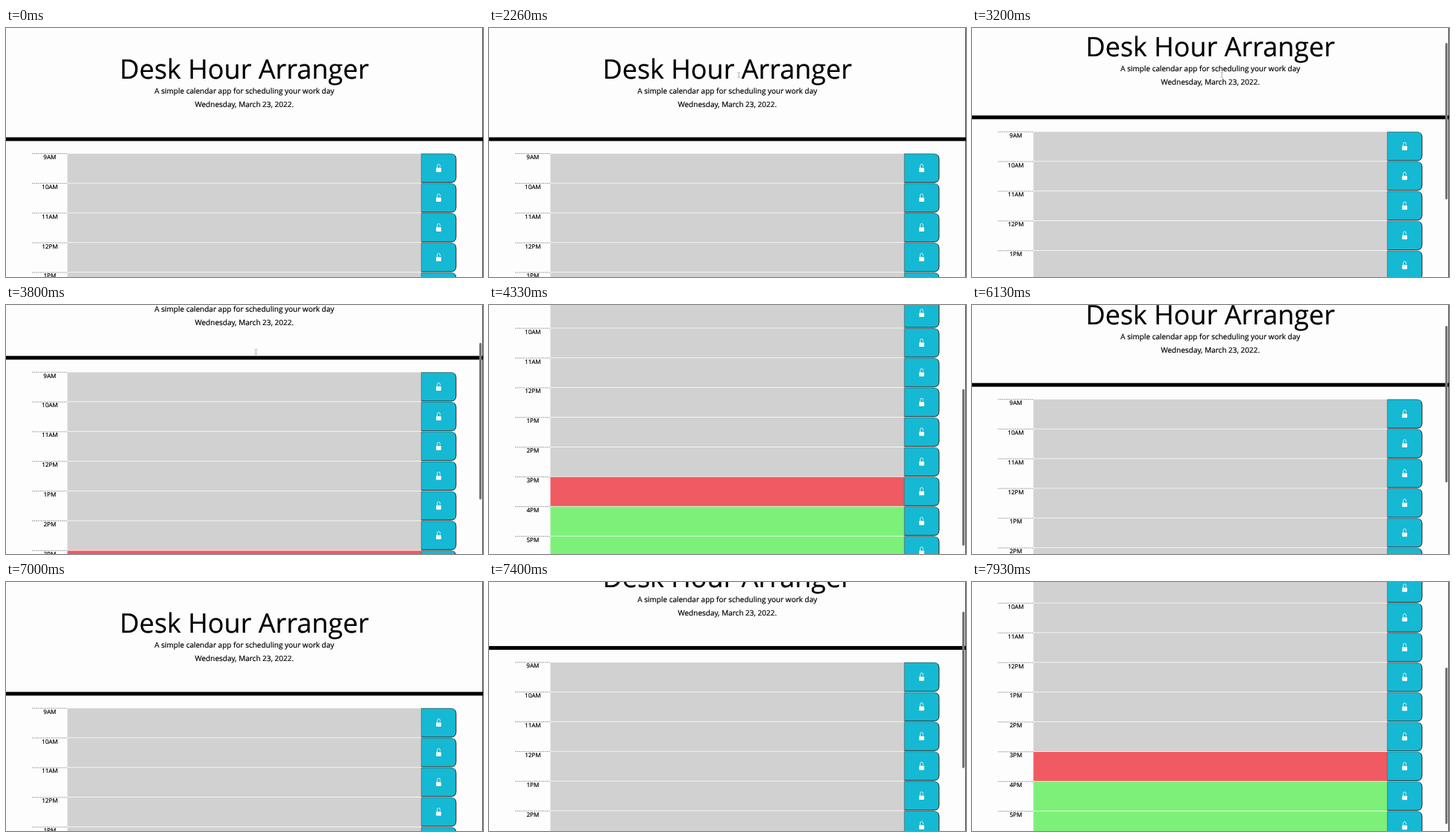
Animation of 640x334 px, one loop 8000 ms. Source, as an HTML page:

```html
<!DOCTYPE html>
<html lang="en">
<head>
<meta charset="utf-8">
<title>Day planner</title>
<style>
  html, body { margin: 0; width: 100%; height: 100%; overflow: hidden; background: #fdfdfd; }
  svg { display: block; width: 100%; height: 100%; }
  text {
    font-family: "Open Sans", "Noto Sans", sans-serif; text-anchor: middle;
    text-rendering: geometricPrecision; stroke: #000; stroke-width: .2px;
  }
</style>
</head>
<body>
<svg viewBox="0 0 640 334">
  <rect width="640" height="334" fill="#fdfdfd"/>
  <rect x="639.2" width=".8" height="334" fill="#1c1c1c"/>
  <g id="page">
    <text x="319.7" y="67.6" font-size="36">Desk Hour Arranger</text>
    <text x="319.8" y="87.7" font-size="10">A simple calendar app for scheduling your work day</text>
    <text x="319.8" y="105.7" font-size="10">Wednesday, March 23, 2022.</text>
    <rect y="146.6" width="640" height="5"/>
    <g id="rows"></g>
  </g>
  <path id="cursor" d="M-1.7 -3.5Q0 -3.5 0 -2.5Q0 -3.5 1.7 -3.5M0 -2.5V2.5M-1.7 3.5Q0 3.5 0 2.5Q0 3.5 1.7 3.5" fill="none" stroke="#777" stroke-width=".8"/>
  <rect id="thumb" x="635" width="3.2" height="210" rx="1.6" fill="#757575"/>
</svg>
<script>
const LOOP = 8000, STEP = 1000 / 15;
const ROW_TOP = 168.2, ROW_PITCH = 39.87;
const el = id => document.getElementById(id);
const page = el("page"), thumb = el("thumb"), cursor = el("cursor");

const hours = ["9AM", "10AM", "11AM", "12PM", "1PM", "2PM", "3PM", "4PM", "5PM"];
const rowColor = i => i < 6 ? "#d1d1d1" : i === 6 ? "#f05a62" : "#7df07a";

el("rows").innerHTML = hours.map((hour, i) => `
  <g transform="translate(0 ${ROW_TOP + i * ROW_PITCH})">
    <path d="M35 .3H82.4" stroke="#222" stroke-width=".5" stroke-dasharray="1.5 1"/>
    <text x="58.8" y="7.7" font-size="8">${hour}</text>
    <rect x="82.4" y=".4" width="474.6" height="39.1" fill="${rowColor(i)}"/>
    <path d="M557.3 .6H597Q603.8 .6 603.8 7.4V32.2Q603.8 39 597 39H557.3Z" fill="#15b9d3" stroke="#333d40" stroke-width=".6"/>
    <path d="M602 2.7Q603.8 4.4 603.8 7.4V32.2Q603.8 39 597 39H557.3" fill="none" stroke="#222" stroke-width=".7"/>
    <rect x="577.1" y="19.4" width="6.8" height="5.6" rx=".8" fill="#fff"/>
    <path d="M578.6 19.6V16.6A1.9 2.1 0 0 1 582.4 16.6V18.2" fill="none" stroke="#fff" stroke-width=".8"/>
  </g>`).join("");

// [time, scroll offset]
const scrollKeys = [
  [0, 0], [2930, 0], [3300, 43], [3600, 76], [3730, 76], [3800, 78.3],
  [4130, 145], [4460, 186], [4730, 186], [5000, 193.2], [5330, 190],
  [5600, 165], [5870, 105], [6133, 42], [6460, 5], [6667, -3],
  [7000, -0.8], [7070, 0], [7333, 44], [7600, 118], [7933, 180], [8000, 180]
];

const slope = i => {
  const a = scrollKeys[i], b = scrollKeys[i + 1];
  return a && b ? (b[1] - a[1]) / (b[0] - a[0]) : 0;
};

// Harmonic mean keeps the curve from overshooting between keys.
const tangent = i => {
  const a = slope(i - 1), b = slope(i);
  return a * b > 0 ? 2 * a * b / (a + b) : 0;
};

function scrollAt(t) {
  let i = 0;
  while (i < scrollKeys.length - 2 && t >= scrollKeys[i + 1][0]) i++;
  const [t0, v0] = scrollKeys[i], [t1, v1] = scrollKeys[i + 1];
  const span = t1 - t0, u = (t - t0) / span, w = 1 - u;
  return v0 * (1 + 2 * u) * w * w + v1 * u * u * (3 - 2 * u)
    + span * u * w * (tangent(i) * w - tangent(i + 1) * u);
}

const ramp = (t, from, to) => Math.min(1, Math.max(0, (t - from) / (to - from)));

function draw(time) {
  const t = Math.floor(time / STEP + 0.1) * STEP;
  const scroll = scrollAt(t);
  page.setAttribute("transform", `translate(0 ${-scroll})`);

  thumb.setAttribute("y", 1.6 + Math.max(0, scroll) * 0.628);
  thumb.setAttribute("opacity", ramp(t, 2930, 3000) - ramp(t, 6750, 6980) + ramp(t, 7060, 7130));

  const move = ramp(t, 1600, 2250), ease = move * (2 - move);
  cursor.setAttribute("transform", `translate(${262 + 73.3 * ease} ${326 - 263 * ease})`);
  cursor.setAttribute("opacity", t >= 1660 && t < 4000 ? 0.7 : 0);
}

function frame() {
  draw(performance.now() % LOOP);
  requestAnimationFrame(frame);
}
frame();
</script>
</body>
</html>
```
